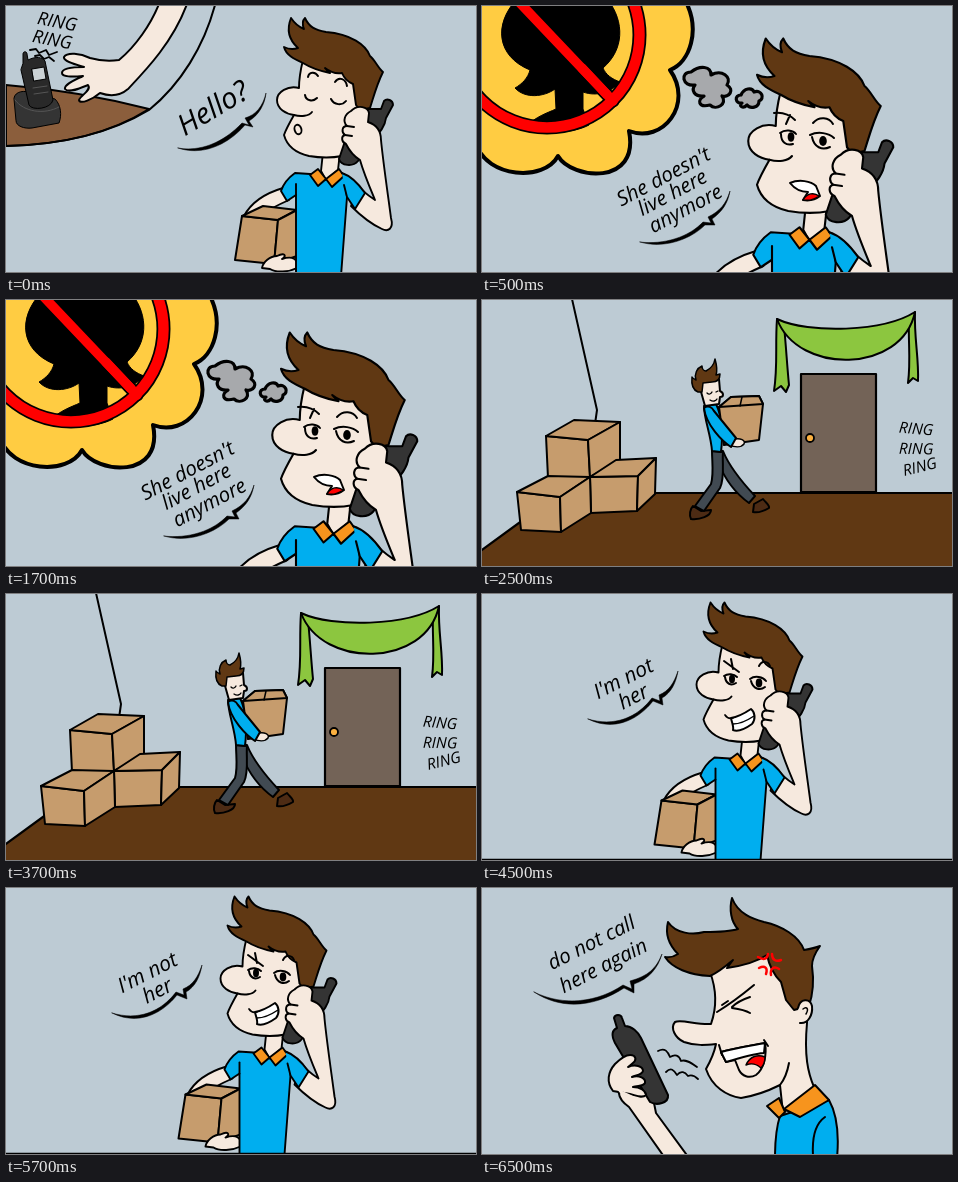
Recreate the animation shown at these times as an HTML page with a canvas. Size 470x266 px, loop 8000 ms.

```html
<!DOCTYPE html>
<html lang="en">
<head>
<meta charset="utf-8">
<title>Wrong number</title>
<style>
html, body { margin: 0; width: 100%; height: 100%; overflow: hidden; background: #bdcbd4; }
canvas { display: block; width: 470px; height: 266px; }
</style>
</head>
<body>
<canvas id="stage"></canvas>
<script>
const W = 470, H = 266, LOOP = 8000;
const SKY = '#bdcbd4', SKIN = '#f6e9de', HAIR = '#603813', BLUE = '#00aeef', ORANGE = '#f7941d',
  DARK = '#343434', BOX = '#c69c6d', RED = '#f00', INK = '#000';

const canvas = document.getElementById('stage');
const ctx = canvas.getContext('2d');
const dpr = window.devicePixelRatio || 1;
canvas.width = W * dpr;
canvas.height = H * dpr;
ctx.lineJoin = ctx.lineCap = 'round';

function shape(d, fill, width = 2, stroke = INK) {
  const path = new Path2D(d);
  if (fill) { ctx.fillStyle = fill; ctx.fill(path); }
  if (width) { ctx.lineWidth = width; ctx.strokeStyle = stroke; ctx.stroke(path); }
}
const line = (d, width = 2, stroke = INK) => shape(d, null, width, stroke);

function dot(x, y, rx, ry = rx, fill = INK, width = 0) {
  ctx.beginPath();
  ctx.ellipse(x, y, rx, ry, 0, 0, Math.PI * 2);
  ctx.fillStyle = fill;
  ctx.fill();
  if (width) { ctx.lineWidth = width; ctx.strokeStyle = INK; ctx.stroke(); }
}

// Hand-lettered text centred on a point, turned by deg
function say(text, x, y, size, deg) {
  ctx.save();
  ctx.translate(x, y);
  ctx.rotate(deg * Math.PI / 180);
  ctx.font = `italic 500 ${size}px "Open Sans", "Noto Sans", sans-serif`;
  ctx.textAlign = 'center';
  ctx.textBaseline = 'middle';
  ctx.fillStyle = INK;
  ctx.fillText(text, 0, 0);
  ctx.restore();
}

const carton = (...faces) => faces.forEach(d => shape(d, BOX));

// Man with phone and box; the features of the face are added per scene
function caller(x, y, scale) {
  ctx.save();
  ctx.translate(x, y);
  ctx.scale(scale, scale);
  const w = 1.9 / Math.sqrt(scale);
  const part = (d, fill) => shape(d, fill, w);

  part('M277 182C260 187 246 195 238 210L257 208C265 202 274 198 283 194Z', SKIN);
  carton('M236 210L272 214L268 258L229 254Z', 'M236 210L257 200L291 204L272 214Z', 'M272 214L291 204V250L268 258Z');
  part('M256 262C257 256 264 250 271 250C279 246 281 250 276 253C285 250 289 252 291 256V262C283 266 270 267 264 263Z', SKIN);

  part('M304 168L289 167C282 172 277 179 275 185L281 195L290 189V270H335L341 191L338 168Z', BLUE);
  line('M290 189V178', w);
  part('M317 146L315 165L320 174L332 164L334 146Z', SKIN);
  part('M312 163L304 169L312 180L320 173Z', ORANGE);
  part('M333 163L320 173L326 181L338 170Z', ORANGE);

  part('M297 54C294 66 293 74 293 82C282 79 271 86 271 94C271 103 280 108 288 109C284 116 280 123 278 129C281 140 290 147 303 150C315 152 326 152 336 150L358 112L352 70L330 55Z', SKIN);
  line('M288 109C295 111 303 110 306 106', w);
  part('M297 57C288 53 280 49 278 41C284 44 289 43 292 42C282 33 281 22 285 12C289 18 293 21 298 23C296 18 297 14 299 12C303 21 309 24 320 26C345 28 360 39 364 50C369 54 372 62 377 66C371 78 369 86 364 102L354 104L350 99L347 78C342 76 338 72 336 67C330 68 324 66 319 62C321 64 322 66 324 67C314 65 305 62 297 57Z', HAIR);

  part('M360 103L375 103L378 95C381 92 387 94 387 99L380 112C379 122 371 129 365 136L352 155C347 161 335 160 333 153L338 138L351 120Z', DARK);
  part('M345 105C352 98 362 101 363 107L362 116C371 119 375 126 375 134C377 155 381 182 385 212C388 223 382 226 376 223C367 219 356 211 345 200L353 180C358 187 363 190 369 194C364 182 358 168 354 154C349 151 344 146 340 138C335 136 335 130 339 129C335 126 336 120 341 120C336 115 339 108 345 105Z', SKIN);
  line('M339 129L346 130M341 120L348 121', w);
  part('M338 179L341 191L349 203L359 187C352 177 345 170 336 167', BLUE);
  ctx.restore();
}

function hello() {
  shape('M0 79C50 83 100 92 143 103C100 130 50 139 0 140Z', '#8b5e3c');
  line('M209 -1C198 40 175 78 143 104C100 130 50 139 -1 140');
  say('RING', 51, 17, 18, 11);
  say('RING', 46, 35, 18, 11);
  line('M24 44L30 43L33 47L40 44L43 49L51 46M29 50L34 49L38 53L43 51L48 55', 1.8);
  shape('M8 92C9 85 19 84 25 87L49 93C55 99 56 109 53 117L26 122C18 123 10 120 10 115Z', DARK, 1);
  shape('M17 57V48C17 45 21 45 21 48L22 54C30 50 36 51 39 55L47 94C45 103 26 105 23 99L15 64Z', '#292929', 1);
  line('M9 94C18 106 38 109 53 101M27 82L41 80M28 88L42 86', 1, '#555');
  shape('M26 63L38 61L40 73L28 75Z', '#cbd2d5', 1);
  shape('M153 -2C145 18 130 40 113 54C99 56 91 54 84 52C74 47 61 46 58 51C57 55 68 58 78 61C68 61 56 62 56 67C56 71 66 71 77 70C69 74 58 78 59 83C63 88 76 81 82 79C86 84 75 89 73 94C74 99 87 93 94 87C105 91 115 89 122 83C140 64 167 36 181 -2Z', SKIN);
  say('Hello?', 208, 104, 29, -31);
  shape('M172 142C195 150 221 140 239 119L247 121L243 115C253 109 259 98 260 87C257 100 250 109 239 112L243 119L236 117C217 137 194 146 172 142Z', INK, 0.5);

  caller(0, 0, 1);
  line('M302 71C303 66 309 65 312 70M329 76C333 70 340 73 341 80M299 89C300 95 307 96 311 92M325 93C328 99 336 100 340 95');
  ctx.save();
  ctx.translate(292, 123.5);
  ctx.rotate(-0.3);
  dot(0, 0, 3.4, 4.8, SKIN, 1.9);
  ctx.restore();
}

function gone() {
  shape('M-6 -6H203C219 24 208 56 188 64C212 98 181 138 147 125C158 180 90 174 76 150C62 176 5 172 -6 138Z', '#ffcc42', 4);
  shape('M34 -6C12 18 14 50 48 64C46 72 40 78 33 82C43 93 62 91 73 83L74 103C65 107 53 111 45 120C62 128 90 128 107 119L101 103V86C115 91 130 86 138 76C130 73 124 69 121 62C142 44 143 16 126 -6Z', INK, 1);
  const slash = 'M18 -24L131 95';
  line(slash, 13);
  line(slash, 9.5, RED);
  for (const [width, color] of [[14, INK], [10.5, RED]]) {
    ctx.beginPath();
    ctx.arc(65, 29, 92.5, 0, Math.PI * 2);
    ctx.lineWidth = width;
    ctx.strokeStyle = color;
    ctx.stroke();
  }
  line('M100 62L131 95', 9.5, RED);
  shape('M213 79C200 81 198 66 209 66C218 59 229 60 229 69C240 63 250 71 245 79C253 84 247 92 240 90C246 98 234 105 228 99C216 102 215 94 222 90C212 91 209 84 213 79Z', '#a7a9ac', 3.2);
  shape('M260 97C253 98 252 89 259 89C262 82 270 81 272 86C280 83 283 93 277 95C277 102 268 103 265 99C261 103 256 100 260 97Z', '#a7a9ac', 3.2);
  say("She doesn't", 182, 172, 20.5, -28);
  say('live here', 191, 188, 20.5, -28);
  say('anymore', 204, 204, 20.5, -28);
  shape('M158 236C181 243 208 234 223 219L233 219L230 213C240 206 246 197 248 185C244 198 238 205 226 211L229 217L221 216C207 231 182 239 158 236Z', INK, 0.5);

  caller(-72.5, 17.5, 1.25);
  line('M292 107C300 106 307 108 313 114M304 118L308 109M331 117C337 110 347 111 351 118');
  line('M298 127C303 123 311 124 314 128M299 128C299 136 304 140 311 138M328 129C336 125 347 127 352 132M330 131C332 141 340 145 348 141');
  dot(309, 131, 3.4, 4.8);
  dot(341, 135, 3.8, 5);
  shape('M308 177C317 173 329 175 334 180L338 190C333 194 327 195 321 194L326 186C319 186 312 182 308 177Z', '#fff');
  shape('M321 194C325 187 332 186 337 190C332 194 327 195 321 194Z', RED, 1.5);
}

function room() {
  shape('M-3 252L78 193H473V269H-3Z', HAIR, 2.2);
  line('M90 -1L115 110L113 124');
  carton('M64 136L106 140L108 177L66 178Z', 'M64 136L92 120L138 122L106 140Z', 'M106 140L138 122V161L108 177Z');
  carton('M108 177L156 176L155 211L109 213Z', 'M108 177L134 160L174 158L156 176Z', 'M156 176L174 158L173 194L155 211Z');
  carton('M35 192L78 197L79 232L39 230Z', 'M35 192L66 176L108 177L78 197Z', 'M78 197L108 177L109 213L79 232Z');

  shape('M319 74H394V192H319Z', '#736357', 2.2);
  dot(328, 138, 4, 4, '#fbb040', 1.8);
  const green = '#8cc63f';
  shape('M295 19C293 45 296 66 292 91L299 86L304 92L307 85C305 65 304 45 302 26Z', green);
  shape('M433 12C432 38 437 58 436 81L431 78L426 83C429 61 426 40 427 20Z', green);
  shape('M295 19C327 34 401 32 433 12C420 74 316 75 295 19Z', green);
  say('RING', 434, 130, 15.5, 5);
  say('RING', 434, 150, 15.5, 1);
  say('RING', 438, 168, 15.5, -14);

  const pants = '#414a52', shoe = '#4d2b14';
  shape('M211 206L219 211L229 210C229 216 218 220 209 219C207 215 208 209 211 206Z', shoe);
  shape('M272 204L281 199C284 203 288 205 287 208C282 211 276 213 271 212Z', shoe);
  shape('M232 150L241 151C247 166 258 180 273 196L267 203C253 193 242 177 236 162Z', pants);
  shape('M230 151L241 152C240 163 243 178 238 188L222 211L213 206L229 184C232 174 230 162 230 151Z', pants);
  shape('M222 106L234 104C240 116 241 135 239 152L230 151C229 135 222 119 222 106Z', BLUE);
  shape('M216 81L237 79L238 91C242 93 242 97 238 97L237 104L223 106Z', SKIN);
  shape('M216 92C211 90 209 86 210 77C211 79 213 79 214 80C212 74 215 68 220 66C220 69 222 71 224 71C228 69 232 65 233 59C235 66 235 72 234 75L238 74C238 79 235 82 230 82L221 83L220 92Z', HAIR, 1.5);
  line('M225 93C227 95 229 94 230 92M234 92L236 91M228 100C231 102 234 101 235 99', 1.3);
  carton('M237 107L249 97L277 96L281 104L277 140L242 145Z', 'M237 107L249 97L277 96L281 104Z');
  line('M260 97L258 106', 1.5);
  shape('M253 139C258 138 264 140 262 144C259 148 252 147 247 145Z', SKIN, 1.5);
  shape('M222 108C226 105 230 107 232 111L254 138L249 147C240 141 224 125 222 108Z', BLUE);
}

function notHer() {
  say("I'm not", 142, 86, 21, -27);
  say('her', 152, 104, 21, -27);
  shape('M106 125C132 138 156 126 171 107L181 111L180 104C189 99 194 89 196 77C192 89 187 97 177 101L178 107L170 104C155 124 132 133 106 125Z', INK, 0.5);

  caller(-56.5, -3.5, 1);
  line('M242 67L257 78M249 65L251 75M277 72C280 66 286 67 288 72');
  line('M242 82C246 79 252 80 255 83M243 83C244 90 249 92 254 89M268 85C273 81 281 83 284 87M269 87C271 95 278 97 283 93');
  dot(250, 85, 3, 4.2);
  dot(277, 89, 3.3, 4.4);
  shape('M249 124C256 123 263 119 269 115C273 118 274 125 270 130C263 135 256 138 251 136C252 133 250 129 249 124Z', '#fff');
  line('M251 130C259 130 266 126 272 122', 1.5);
  line('M243 121C245 124 248 125 251 124', 1.7);
  line('M0 265.5H470', 1.5);
}

function shout() {
  say('do not call', 110, 56, 20.5, -27);
  say('here again', 122, 79, 20.5, -27);
  shape('M52 104C82 124 116 117 142 100L152 105L152 96C167 91 176 80 180 66C174 81 166 88 148 93L150 101L141 97C116 114 82 119 52 104Z', INK, 0.5);

  shape('M298 228C294 240 293 252 293 270H355C357 248 356 228 347 212Z', BLUE);
  line('M343 229C333 236 330 250 331 267');
  shape('M228 84C234 100 236 116 229 136C215 137 199 131 193 134C188 140 193 150 202 154C213 158 224 157 234 156C232 166 228 174 224 181C230 199 245 208 259 210C272 208 286 203 298 197L301 225L332 199C326 185 322 168 325 135L325 90L284 60Z', SKIN);
  line('M307 175C305 186 302 192 298 197');
  shape('M228 88C207 87 190 80 183 69C188 70 193 68 196 66C187 57 183 46 186 34C194 46 211 47 222 44C237 44 250 43 256 41C249 34 247 21 250 10C256 26 271 31 282 34C300 38 317 48 322 62C328 61 333 60 338 58C333 65 330 72 330 78C332 92 331 106 327 118L312 122L304 112L299 94C292 87 287 77 285 67C273 75 259 78 245 80L251 72C244 78 237 84 228 88Z', HAIR);
  shape('M316 120C318 110 328 110 330 118C331 127 326 136 318 135', SKIN);
  line('M321 121C325 118 327 121 324 126', 1.5);
  line('M235 124C248 116 260 107 272 97M240 117L246 113M250 119C256 113 262 111 268 109M250 120C257 121 263 122 268 125');
  shape('M239 164C254 160 268 158 283 155C285 167 282 181 274 187C267 191 260 188 257 182L253 172L244 174Z', SKIN);
  shape('M239 164C254 160 268 158 283 155L282 165C270 166 257 170 244 174Z', '#fff');
  shape('M264 177C268 168 276 166 283 169C283 174 281 178 279 180C275 176 269 175 264 177Z', RED, 1.5);
  line('M237 157L240 167M282 152L286 158');
  line('M276 69C281 72 285 72 286 66M290 66C290 72 294 74 299 72M277 80C283 77 286 80 284 86M289 87C288 80 292 78 297 81', 2.5, RED);
  shape('M297 210L285 218L297 230L303 224Z', ORANGE);
  shape('M333 197L302 221L318 229L347 212Z', ORANGE);

  shape('M143 191C134 199 134 210 147 219L183 270H207L174 225L170 205Z', SKIN);
  shape('M132 130C133 126 139 126 140 130L143 138C150 138 156 144 159 150L186 207C187 215 175 218 168 214L133 155C129 147 130 142 135 140Z', DARK);
  shape('M131 203C124 194 126 184 133 176C140 169 147 165 152 168C156 172 151 175 146 179C153 176 161 178 161 183C160 187 154 187 150 189C157 187 164 190 163 195C161 199 155 197 151 199C158 199 164 203 164 207C160 211 153 207 148 206Z', SKIN);
  shape('M134 200L149 207L166 216L163 226L147 216Z', SKIN, 0);
  line('M176 163C183 159 186 164 188 169C193 166 197 167 199 173C203 171 208 174 215 179M184 184C189 179 192 182 195 187C199 182 203 184 206 188C210 186 213 188 216 191', 1.8);
}

const scenes = [[0, hello], [500, gone], [2500, room], [4500, notHer], [6500, shout]];
const begin = performance.now();

function tick() {
  const t = (performance.now() - begin) % LOOP;
  const draw = scenes.filter(([start]) => start <= t).pop()[1];
  ctx.setTransform(dpr, 0, 0, dpr, 0, 0);
  ctx.fillStyle = SKY;
  ctx.fillRect(0, 0, W, H);
  draw();
  requestAnimationFrame(tick);
}
tick();
</script>
</body>
</html>
```
